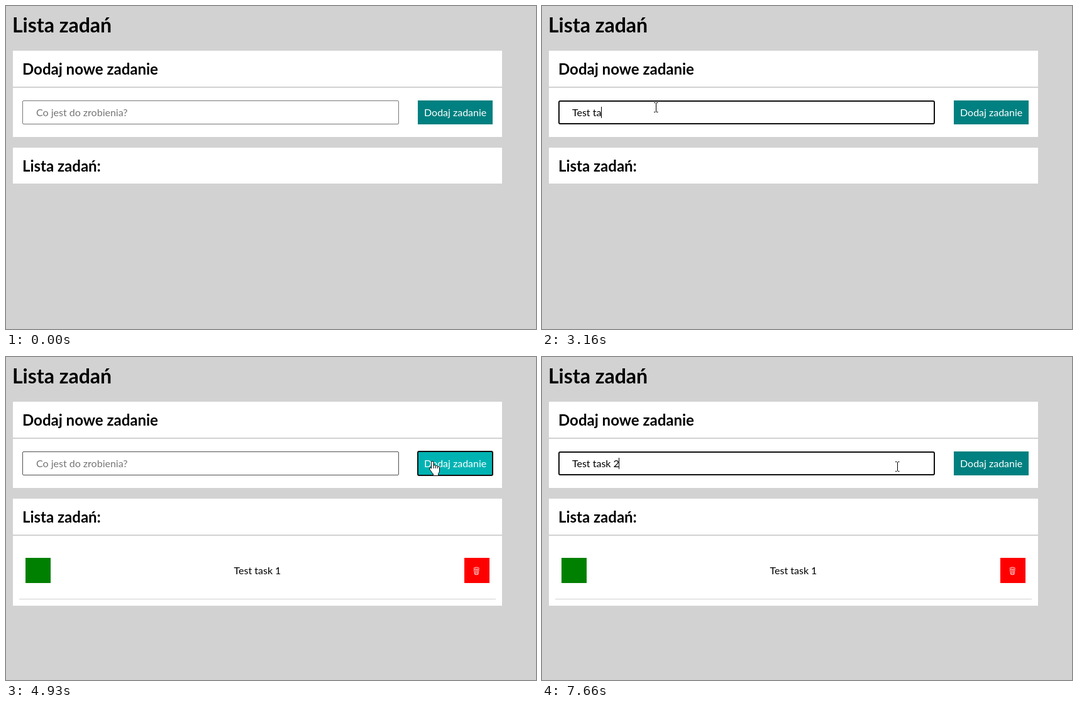
An HTML page for the animation above (8000 ms loop, 843x513 px).

```html
<!DOCTYPE html>
<html lang="pl">
<head>
<meta charset="utf-8">
<title>Lista zadań</title>
<style>
  html, body { margin: 0; width: 100%; height: 100%; overflow: hidden; background: #d2d2d2; }
  svg { display: block; width: 100%; height: 100%; }
  text { font: 16px Lato, sans-serif; white-space: pre; }
  .h1 { font-size: 32px; font-weight: 700; }
  .h2 { font-size: 24px; font-weight: 700; }
</style>
</head>
<body>
<svg viewBox="0 0 843 513">
  <rect width="843" height="513" fill="#d2d2d2"/>
  <text class="h1" x="10" y="42">Lista zadań</text>

  <path fill="#fff" d="M11 71h778v57H11zM11 130h778v78H11zM11 225h778v57H11z"/>
  <text class="h2" x="26" y="109">Dodaj nowe zadanie</text>
  <text class="h2" x="26" y="263">Lista zadań:</text>

  <rect id="field" fill="#fff"/>
  <text id="value" x="48" y="175"></text>
  <rect id="caret" y="160" width="1" height="18"/>

  <rect id="button" x="655" y="150" width="119" height="38"/>
  <rect id="ring" x="655" y="150" width="119" height="38" rx="2" fill="none" stroke="#101010" stroke-width="2"/>
  <text x="665" y="175" fill="#fff">Dodaj zadanie</text>

  <g id="item">
    <path fill="#fff" d="M11 284h778v111H11z"/>
    <path fill="#d2d2d2" d="M21 384h758v1H21z"/>
    <path fill="green" d="M31 319h40v40H31z"/>
    <path fill="red" d="M729 319h40v40H729z"/>
    <g fill="none" stroke="#fff" stroke-width=".9">
      <ellipse cx="748.3" cy="335.6" rx="4.3" ry="1.5"/>
      <path d="M744.6 337l.9 8q2.8 1.4 5.6 0l.9-8M747.2 337.6v7M749.5 337.6v7"/>
    </g>
    <text x="400" y="345" text-anchor="middle">Test task 1</text>
  </g>

  <circle id="click" r="12.5" fill="#ff0" fill-opacity=".5"/>
  <g id="arrow" fill="#fff" stroke="#000">
    <path d="M.5.5v16l3.7-3.5 2.4 5.6 2.3-1-2.4-5.4h5z"/>
  </g>
  <g id="beam" fill="none" stroke="#000">
    <path d="M-3 -7.5h2.5M1 -7.5h2.5M-3 7.5h2.5M1 7.5h2.5M.5 -7v14"/>
  </g>
  <g id="hand" fill="#fff" stroke="#000" stroke-linejoin="round">
    <path d="M-1.5 11V1.5Q-1.5 -.5 .2 -.5T2 1.5V6Q4.5 4.7 5.2 6.8 7.5 5.7 8.3 7.7 11.5 7 11.5 10V15Q11.5 17 9.5 19.5V22.5H1.5V20Q-1 17.5 -2.5 14.5L-4.5 12Q-5 9.7 -3 9.8z"/>
    <path fill="none" d="M2 6v5M5.2 7v4M8.3 8v3"/>
  </g>
</svg>
<script>
const LOOP = 8000;
const $ = id => document.getElementById(id);
const set = (id, attrs) => {
  for (const k in attrs) $(id).setAttribute(k, attrs[k]);
};
const show = (id, on) => set(id, { visibility: on ? 'visible' : 'hidden' });
const last = (steps, t) => steps.filter(s => s[0] <= t).pop();
const within = (t, a, b) => t >= a && t < b;

// time, pointer, x, y
const pointer = [
  [0, 'none', 0, 0],
  [120, 'arrow', 649, 445], [200, 'arrow', 595, 402], [280, 'arrow', 518, 349],
  [360, 'arrow', 440, 302], [440, 'arrow', 395, 279], [510, 'arrow', 325, 243],
  [590, 'arrow', 247, 202], [670, 'beam', 210, 178], [750, 'beam', 190, 165],
  [830, 'beam', 181, 161],
  [4090, 'beam', 260, 157], [4170, 'beam', 400, 160], [4240, 'beam', 518, 166],
  [4320, 'beam', 590, 168], [4390, 'arrow', 634, 168], [4470, 'hand', 660, 167],
  [4550, 'hand', 671, 166], [4620, 'hand', 676, 166], [4700, 'hand', 678, 166],
  [5010, 'hand', 664, 168], [5090, 'beam', 610, 171], [5170, 'beam', 578, 173],
  [5240, 'beam', 565, 174]
];

const keys = [
  [1980, 2230, 2380, 2610, 2760, 2990, 3160, 3390, 3470, 3540, 3770],
  [6090, 6320, 6470, 6550, 6720, 6870, 7100, 7250, 7420, 7490, 7660]
];
const clicks = [[1050, 1140], [4850, 4930], [5320, 5400]];
const caretOff = [[1600, 1980], [4320, 4850], [5860, 6090]];

function typed(t) {
  const second = t >= 4930;
  const count = keys[+second].filter(k => k <= t).length;
  return ('Test task ' + (second ? 2 : 1)).slice(0, count);
}

function draw(t) {
  const [, kind, x, y] = last(pointer, t);
  for (const id of ['arrow', 'beam', 'hand']) {
    show(id, id === kind);
    set(id, { transform: `translate(${x} ${y})` });
  }
  const pressed = clicks.some(c => within(t, ...c));
  show('click', pressed);
  set('click', { cx: x + .5, cy: y });

  const focus = within(t, 1050, 4850) || t >= 5320;
  const line = focus ? 2 : 1;
  const hover = within(t, 670, 1050) || within(t, 4930, 5320);
  set('field', {
    x: 26 + line / 2, y: 150 + line / 2, width: 599 - line, height: 38 - line,
    rx: focus ? 2 : 1.5, 'stroke-width': line,
    stroke: focus ? '#101010' : hover ? '#4f4f4f' : '#767676'
  });

  const text = typed(t);
  const label = $('value');
  label.textContent = text || 'Co jest do zrobienia?';
  set('value', { fill: text ? '#000' : '#757575' });
  const width = text ? label.getComputedTextLength() : 0;
  set('caret', { x: 48 + Math.floor(width) });
  show('caret', focus && !caretOff.some(c => within(t, ...c)));

  const down = within(t, 4850, 4930);
  set('button', { fill: down ? '#00e6e6' : kind === 'hand' ? '#00b3b3' : '#008080' });
  show('ring', within(t, 4850, 5320));
  show('item', t >= 4930);
}

const start = performance.now();
function tick() {
  draw((performance.now() - start) % LOOP);
  requestAnimationFrame(tick);
}
tick();
</script>
</body>
</html>
```
